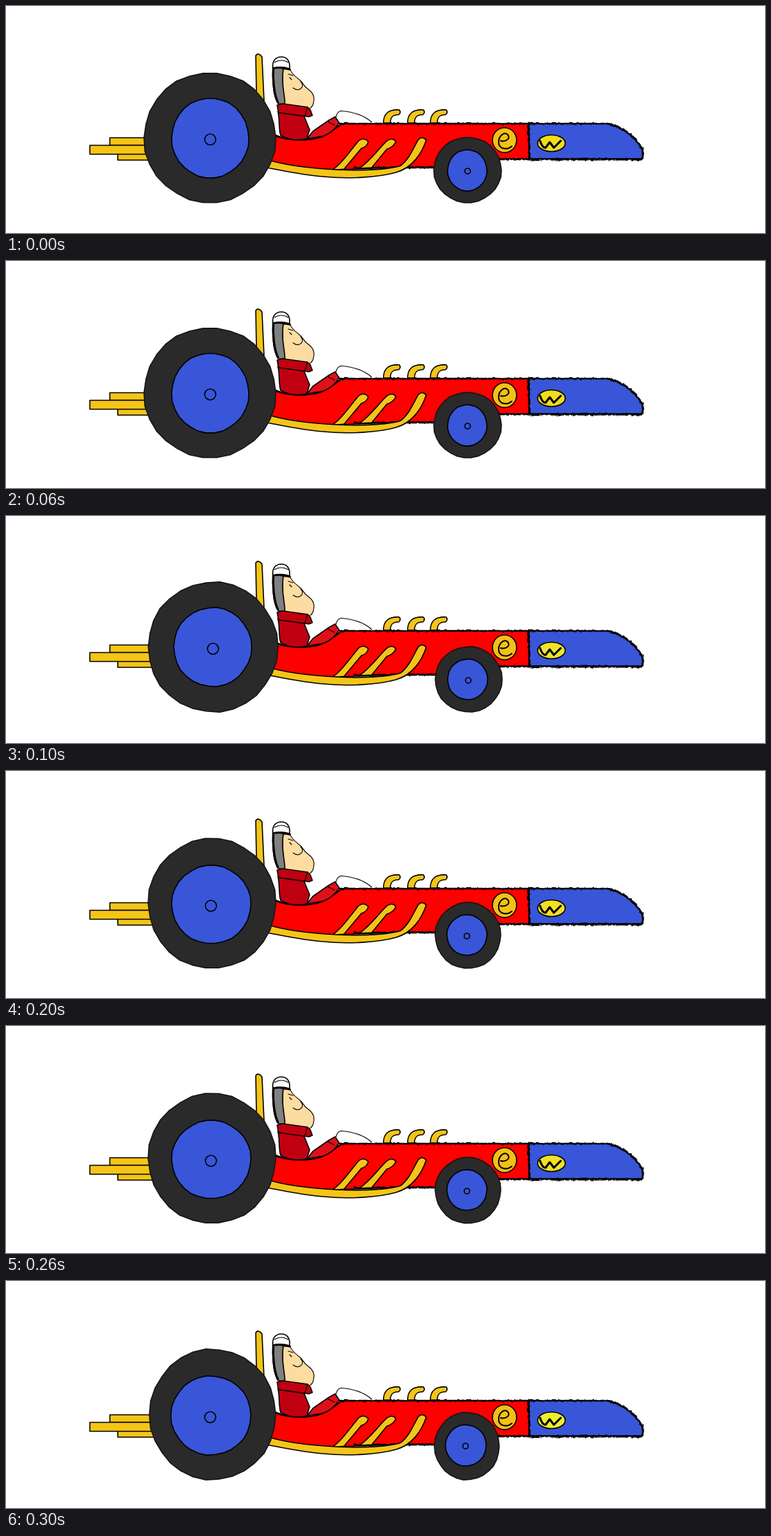
These frames come from a looping animation (1100x330 px, 400 ms). An HTML page:

```html
<!DOCTYPE html>
<html lang="en">
<head>
<meta charset="utf-8">
<title>Dragster</title>
<style>
html, body { margin: 0; height: 100%; overflow: hidden; background: #fff; }
svg { display: block; width: 1100px; height: 330px; }
path, rect, ellipse { stroke: #000; stroke-width: 1.6; stroke-linejoin: round; stroke-linecap: round; }
.pipe { fill: #f4c517; }
.line { fill: none; }
.bold { fill: none; stroke-width: 3; filter: url(#rough); }
.thin { stroke-width: 1.1; }
.tyre { fill: #2a2a2a; stroke: #151515; }
.rim { fill: #3956d8; }
</style>
</head>
<body>
<svg viewBox="0 0 1100 330">
  <defs>
    <filter id="rough" filterUnits="userSpaceOnUse" x="0" y="0" width="1100" height="330">
      <feTurbulence type="fractalNoise" baseFrequency=".22" numOctaves="2" seed="4"/>
      <feDisplacementMap in="SourceGraphic" scale="4" xChannelSelector="R" yChannelSelector="G"/>
    </filter>
    <path id="stack" class="pipe" d="M547 170C547 157 554 150 570 151Q573 155 569 158C560 158 557 162 557 170Z"/>
  </defs>

  <g id="car">
    <!-- tail pipes and roll bar -->
    <rect class="pipe" x="150.500" y="191.500" width="70" height="11"/>
    <rect class="pipe" x="162" y="214" width="60" height="10"/>
    <rect class="pipe" x="121.500" y="202.500" width="100" height="13"/>
    <path class="pipe" d="M362 72Q366 67 371 74L374 138L363 130Z"/>

    <!-- body -->
    <path fill="#f00" stroke="none" d="M380 182C400 195 430 198 455 191C470 186 479 176 487 171H758V222H715L620 234H580L480 238C440 239 400 233 380 226Z"/>
    <path class="line" d="M385 186C400 195 430 198 455 191C470 186 479 176 487 171"/>
    <path fill="#3956d8" stroke="none" d="M758 171H872C892 175 911 190 922 208L923 222H758Z"/>
    <path class="bold" style="stroke-width:2.400" d="M484 171H872M505 235H622M700 223H758"/>
    <path class="bold" d="M757 171L759 222M758 223H921Q926 213 920 204C910 188 892 175 872 171"/>

    <!-- driver -->
    <path fill="#fddca2" class="thin" d="M400 92H412C413 98 420 103 425 107C432 112 430 116 438 121C446 127 448 133 445 143Q443 149 436 151L403 143Z"/>
    <path fill="#808080" d="M387 88C386 110 387 132 395 142L404 143C405 130 398 116 402 91Z"/>
    <path class="line" style="stroke-width:3.200" d="M387.500 86C386 108 389 130 394 140M388 90Q400 88 411 92"/>
    <path fill="#fff" d="M387 90C385 80 391 74 399 74C408 74 412 81 411 91Q399 87 387 90Z"/>
    <path class="line thin" d="M389 82Q399 76 409 82M409 99L416 101M411 104L414 107M416 119Q424 125 429 118Q431 114 427 110"/>
    <path fill="#df1018" d="M436 193L445 182L468 166L477 161L483 170Q474 184 460 189Z"/>
    <path fill="#c00010" d="M394 153C397 165 395 179 398 188Q415 198 436 193L440 180L432 160Z"/>
    <path fill="#c00010" d="M393 144L401 142L437 147L441 151L444 159L439 161L395 155Z"/>
    <path class="line thin" d="M437 147L433 160M466 168L476 173"/>
    <path fill="#fff" class="thin" d="M478 162Q480 153 486 152.500Q515 155 530 169"/>

    <!-- engine pipes -->
    <use href="#stack"/>
    <use href="#stack" x="35"/>
    <use href="#stack" x="68"/>
    <path class="pipe" d="M511 196Q518 190 525 197Q524 204 515 207L490 237L472 239C486 230 497 213 511 196Z"/>
    <path class="pipe" d="M551 197Q560 190 565 197Q562 205 552 208L530 235L512 236C527 226 538 210 551 197Z"/>
    <path class="pipe" d="M378 223C405 232 440 236 480 238C520 240 560 237 572 232C584 223 590 208 597 195Q603 188 609 195C603 213 590 235 565 242C540 249 495 252 460 248C430 246 400 239 378 235Z"/>

    <!-- lettered badges -->
    <ellipse cx="722.500" cy="195" rx="17.500" ry="18" fill="#f3c015"/>
    <path class="line" style="stroke-width:2" d="M717 196C725 198 732 192 727 187C722 182 714 189 714 198C714 208 726 210 733 204"/>
    <ellipse id="badge" cx="790.500" cy="199.500" rx="20" ry="12"/>
    <path class="line" style="stroke-width:3" d="M774 196Q777 206 782 206L788 198L794 206L804 196"/>
  </g>
  <g id="rear"></g>
  <g id="front"></g>
</svg>
<script>
const byId = id => document.getElementById(id);

// One row per pose: [left, right, top, bottom] of tyre and rim, then hub centre.
const rearPoses = [
  [200, 391, 97, 286, 240, 352, 134, 250, 296, 194],
  [206, 394, 96, 285, 243, 356, 133, 248, 300, 193],
  [206, 391, 98, 287, 240, 355, 137, 251, 297, 196],
  [208, 391, 99, 289, 239, 355, 138, 253, 296, 198]
];
const frontPoses = [
  [620, 718, 191, 286, 640, 697, 209, 269, 669, 240],
  [622, 719, 190, 285, 640, 698, 208, 267, 670, 239],
  [622, 717, 191, 287, 639, 697, 209, 268, 668, 240],
  [621, 715, 191, 289, 637, 696, 209, 269, 666, 240]
];
const bounce = [0, -4, 0, 3];
const badgeColors = ['#f2dc1c', '#eee52a', '#f1e023', '#eeee2c'];

// Slightly faceted, hand-cut disc that fills the given box.
function disc(cls, [left, right, top, bottom], turn) {
  const sides = 30;
  let d = '';
  for (let i = 0; i < sides; i++) {
    const a = i / sides * 2 * Math.PI;
    const r = 1 + .006 * Math.sin(5 * a + turn) + .004 * Math.sin(11 * a - turn);
    const x = (left + right) / 2 + (right - left) / 2 * r * Math.cos(a);
    const y = (top + bottom) / 2 + (bottom - top) / 2 * r * Math.sin(a);
    d += (i ? 'L' : 'M') + x.toFixed(1) + ' ' + y.toFixed(1);
  }
  return `<path class="${cls}" d="${d}Z"/>`;
}

function wheel(pose, hub, turn) {
  const [x, y] = pose.slice(8);
  return disc('tyre', pose.slice(0, 4), turn) + disc('rim', pose.slice(4, 8), turn) +
    `<ellipse class="rim" cx="${x}" cy="${y}" rx="${hub}" ry="${hub}"/>`;
}

let shown = -1;
function draw() {
  const step = Math.floor(performance.now() / 100) % 4;
  if (step !== shown) {
    shown = step;
    byId('car').setAttribute('transform', `translate(0 ${bounce[step]})`);
    byId('badge').setAttribute('fill', badgeColors[step]);
    byId('rear').innerHTML = wheel(rearPoses[step], 8, step * 1.6);
    byId('front').innerHTML = wheel(frontPoses[step], 4, step * 1.6);
  }
  requestAnimationFrame(draw);
}
draw();
</script>
</body>
</html>
```
